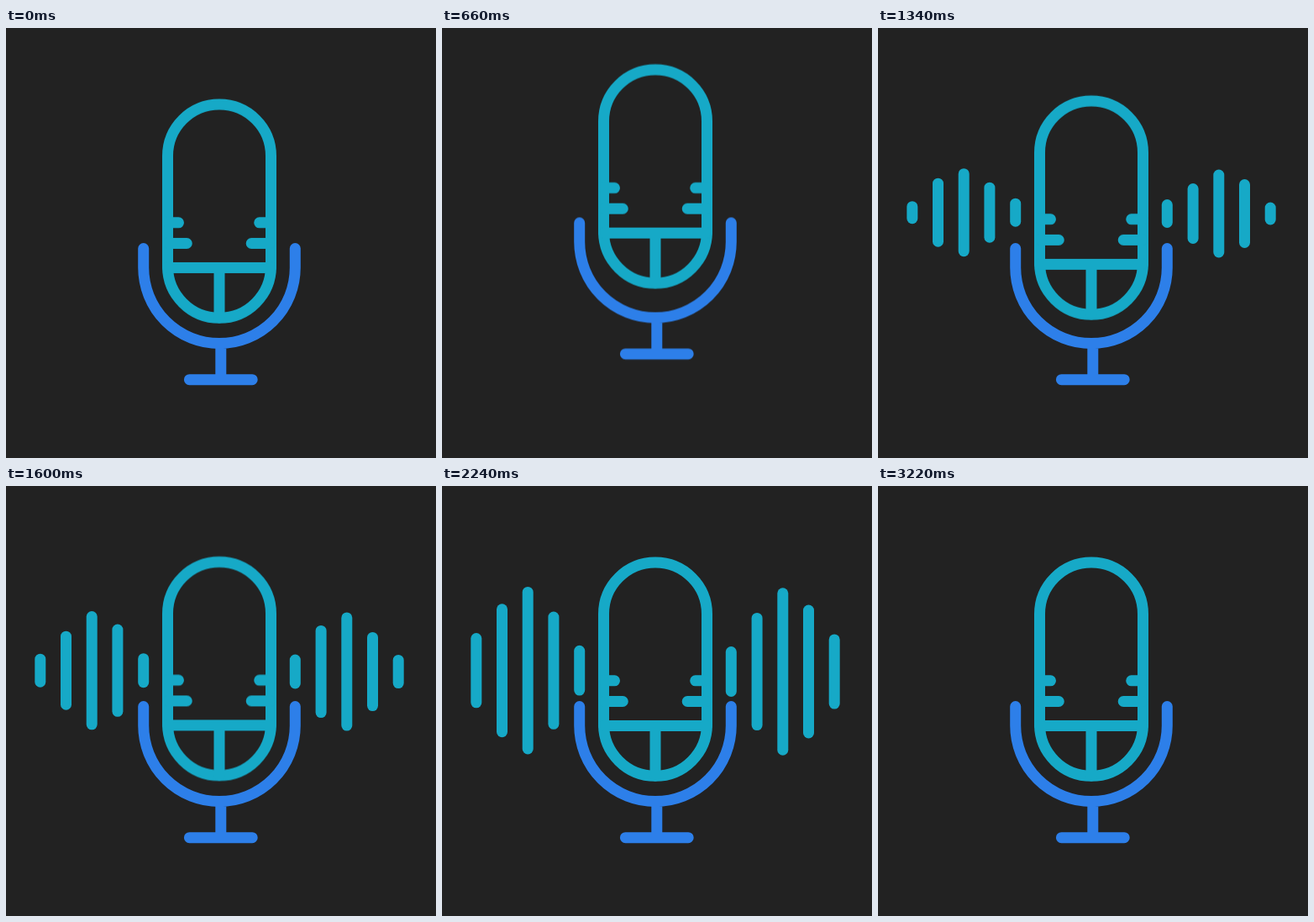
Animation, 512 px wide and 512 px high, one loop 3.24 s. Source, as an HTML page:

```html
<!DOCTYPE html>
<html lang="en">
<head>
<meta charset="utf-8">
<title>Microphone</title>
<style>
  html, body { margin: 0; width: 100%; height: 100%; overflow: hidden; background: #222; }
  svg { display: block; width: 100%; height: 100%; }
  path, .shell { fill: none; stroke-width: 13; stroke-linecap: round; }

  .head, .stand, .bars rect {
    animation: 3240ms cubic-bezier(.37, 0, .63, 1) infinite;
  }
  .head { stroke: #16a9c7; animation-name: bounce; }
  .stand { stroke: #2d7fe9; animation-name: lift; }
  .bars rect { width: 13px; height: 0; rx: 6.5px; fill: #16a9c7; animation-name: pulse; }

  @keyframes bounce {
    0% { transform: translateY(0); }
    19.1% { transform: translateY(-43px); }
    30.9% { transform: translateY(11px); }
    43.2% { transform: translateY(-5px); }
    55.6% { transform: translateY(3.8px); }
    67.9%, 100% { transform: translateY(0); }
  }
  @keyframes lift {
    0% { transform: translateY(0); }
    19.1% { transform: translateY(-31.5px); }
    30.9%, 100% { transform: translateY(0); }
  }
  @keyframes pulse {
    0%, 33.95% { height: 0; y: 0; }
    41.36% { height: var(--a); y: calc(var(--a) / -2); }
    57.41% { height: var(--b); y: calc(var(--b) / -2); }
    70.37% { height: var(--c); y: calc(var(--c) / -2); }
    83.95% { height: var(--d); y: calc(var(--d) / -2); }
    97.5%, 100% { height: 0; y: 0; }
  }

  /* bar heights at each beat, from the outermost bar inwards */
  .bars :nth-child(1) { --a: 27px; --b: 53px; --c: 90px; --d: 117px; }
  .bars :nth-child(2) { --a: 82px; --b: 106px; --c: 160px; --d: 144px; }
  .bars :nth-child(3) { --a: 105px; --b: 177px; --c: 200px; --d: 132px; }
  .bars :nth-child(4) { --a: 72px; --b: 148px; --c: 140px; --d: 83px; }
  .bars :nth-child(5) { --a: 34px; --b: 48px; --c: 60px; --d: 48px; }
</style>
</head>
<body>
<svg viewBox="0 0 512 512">
  <g class="bars" transform="translate(0 219.7)">
    <rect x="34.3"/><rect x="65"/><rect x="95.7"/><rect x="126.4"/><rect x="157.2"/>
  </g>
  <g class="bars" transform="translate(508 221) scale(-1 1)">
    <rect x="34.3"/><rect x="65"/><rect x="95.7"/><rect x="126.4"/><rect x="157.2"/>
  </g>
  <g class="stand">
    <path d="M163.7 262.5V285.3A90.3 90.3 0 0 0 344.3 285.3V262.5M255.8 376V418.7M218.4 418.7H293.2"/>
  </g>
  <g class="head">
    <rect class="shell" x="192.5" y="91" width="123" height="254.3" rx="61.5"/>
    <path d="M192.5 285.4H315.5M254 285.4V345"/>
    <path d="M192.5 231.8H205.5M192.5 256.5H215.3M315.5 231.8H301.7M315.5 256.5H292.2"/>
  </g>
</svg>
</body>
</html>
```
